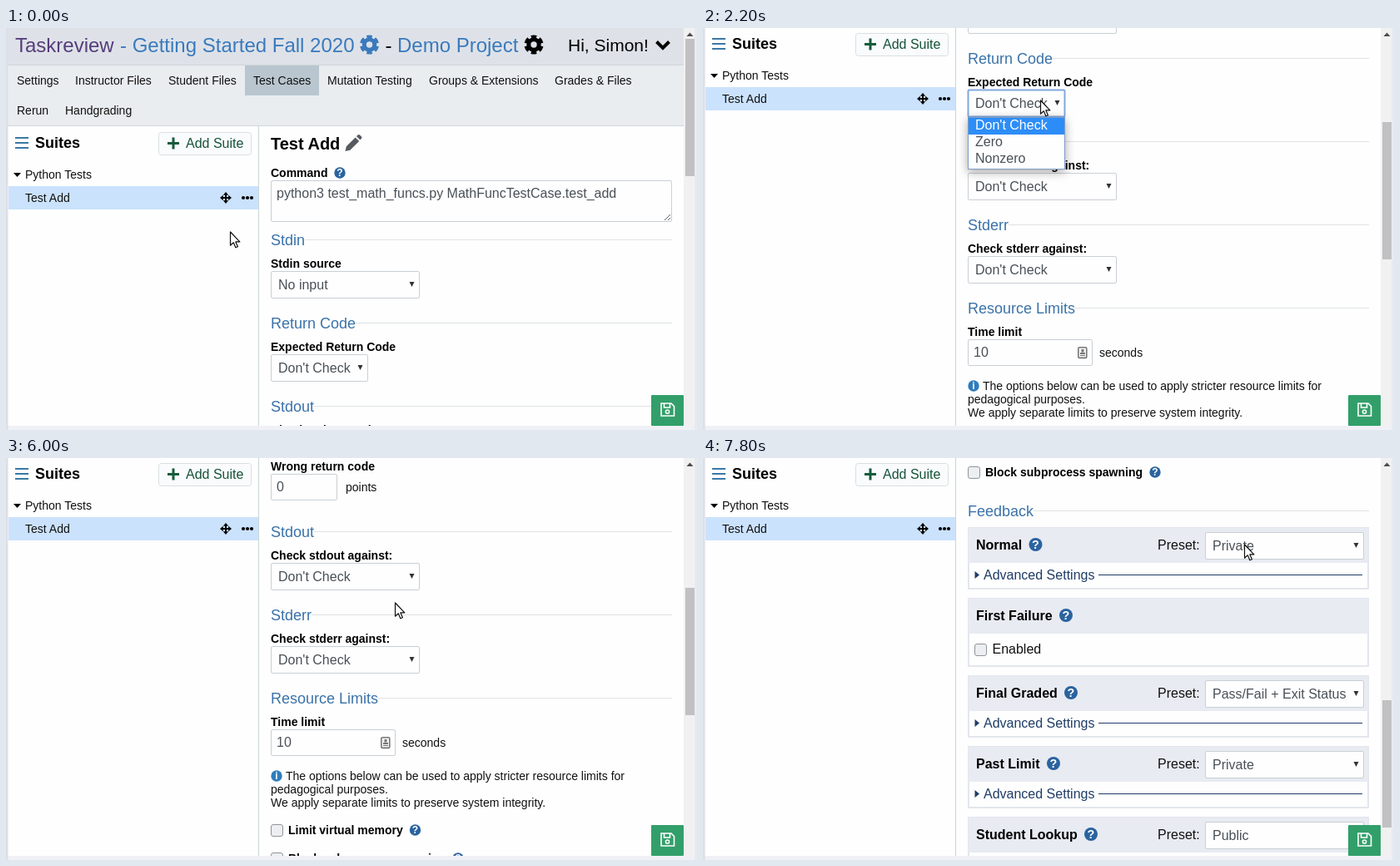
These frames come from a looping animation (830 px wide and 483 px high, 8 s). An HTML page:

```html
<!DOCTYPE html>
<html lang="en">
<head>
<meta charset="utf-8">
<title>Test case editor</title>
<style>
html, body { margin: 0; width: 100%; height: 100%; overflow: hidden; background: #fefefe; }
svg { display: block; width: 830px; height: 483px; font-family: "Liberation Sans", Arial, sans-serif; }
text { white-space: pre; }
.popup { filter: drop-shadow(0 3px 6px rgba(0, 0, 0, .35)); }
</style>
</head>
<body>
<svg id="stage" viewBox="0 0 830 483"></svg>
<script>
const LOOP = 8000, HEADER = 119, GROWTH = 124;
const INK = '#495057', LINK = '#3a72a9', HELP = '#2a639f', NAVY = '#1f3d66', EDGE = '#c9cfd5', FOCUS = '#82a8dc';
const stage = document.getElementById('stage');

// Drawing helpers
function add(parent, tag, attrs = {}, content) {
  const el = document.createElementNS('http://www.w3.org/2000/svg', tag);
  for (const key in attrs) el.setAttribute(key, attrs[key]);
  if (content !== undefined) el.textContent = content;
  return parent.appendChild(el);
}
const group = (parent = stage, attrs) => add(parent, 'g', attrs);
const rect = (g, x, y, width, height, fill, more) => add(g, 'rect', { x, y, width, height, fill, ...more });
const path = (g, d, fill = '#000', more) => add(g, 'path', { d, fill, ...more });
const stroke = (g, d, color, width = 1, more) => path(g, d, 'none', { stroke: color, 'stroke-width': width, ...more });
const circle = (g, cx, cy, r, fill, more) => add(g, 'circle', { cx, cy, r, fill, ...more });
const text = (g, x, y, str, size = 14, fill = '#111', more) =>
  add(g, 'text', { x, y, 'font-size': size, fill, ...more }, str);
const bold = (g, x, y, str, size = 14, fill = '#000') => text(g, x, y, str, size, fill, { 'font-weight': 700 });
const frame = (g, x, y, w, h, color = EDGE, width = 1) =>
  rect(g, x + .5, y + .5, w - 1, h - 1, '#fefefe', { rx: 1.5, stroke: color, 'stroke-width': width });
const focusRing = (g, x, y, w, h) =>
  rect(g, x + .5, y + .5, w - 1, h - 1, 'none', { rx: 1.5, stroke: FOCUS, 'stroke-width': 2 });

// Animation helpers: every value holds until the next step
function play(el, steps, style) {
  const frames = steps.map(step => ({ ...style(...step), offset: step[0] / LOOP, easing: 'step-end' }));
  frames.push({ ...style(...steps.at(-1)), offset: 1 });
  el.animate(frames, { duration: LOOP, iterations: Infinity });
}
function show(el, from, to = LOOP) {
  const steps = [[from, 1]];
  if (from > 0) steps.unshift([0, 0]);
  if (to < LOOP) steps.push([to, 0]);
  play(el, steps, (t, opacity) => ({ opacity }));
  return el;
}
const shift = (x, y) => ({ transform: `translate(${x}px, ${y}px)` });

// Icons
function gear(g, x, y, color) {
  circle(g, x, y, 6.2, 'none', { stroke: color, 'stroke-width': 5 });
  circle(g, x, y, 9.4, 'none', { stroke: color, 'stroke-width': 4.4, pathLength: 12,
    'stroke-dasharray': '1.25 .75', 'stroke-dashoffset': -.375 });
}
function help(g, x, y, r = 6.7, mark = '?', color = HELP) {
  circle(g, x, y, r, color);
  text(g, x, y + r * .66, mark, r * 1.8, '#fff', { 'font-weight': 700, 'text-anchor': 'middle' });
}
function checkbox(g, x, y) {
  rect(g, x + .5, y + .5, 14, 14, '#eceef1', { rx: 2.5, stroke: '#8f959b' });
}

// Form parts
function legend(g, y, str, lineX) {
  text(g, 318, y, str, 18, LINK);
  stroke(g, `M${lineX} ${y - 6.5}H800`, '#dfe2e5');
}
function select(g, x, y, w, h, value) {
  frame(g, x, y, w, h);
  path(g, `M${x + w - 12.5} ${y + 13}h6l-3 6z`, '#333');
  if (value) text(g, x + 9, y + h / 2 + 5.5, value, 16, INK);
}
function choice(g, y, title, lineX, label, value, w = 179) {
  legend(g, y, title, lineX);
  bold(g, 318, y + 27, label);
  select(g, 318, y + 31, w, 33, value);
}
function points(g, y, label) {
  bold(g, 318, y, label);
  frame(g, 318, y + 4, 80, 32);
  text(g, 408, y + 25, 'points');
}
function card(g, y, title, helpX, preset) {
  const height = preset ? 75 : 83;
  rect(g, 319, y + 1, 480, height - 2, '#fefefe', { stroke: '#e3e6ed', 'stroke-width': 2 });
  rect(g, 319, y + 1, 480, 42, '#e8ebf2');
  bold(g, 328, y + 27, title, 16);
  help(g, helpX, y + 21, 8);
  if (preset) {
    text(g, 546, y + 27, 'Preset:', 16);
    select(g, 603, y + 6, 191, 33, preset);
    path(g, `M326.5 ${y + 53}v9l5.5 -4.5z`, NAVY);
    text(g, 337, y + 63, 'Advanced Settings', 16, NAVY);
    stroke(g, `M475 ${y + 57.5}H792`, NAVY);
  } else {
    checkbox(g, 326, y + 55);
    text(g, 347.5, y + 67, 'Enabled', 16);
  }
}

// Main form
const panel = group();
bold(panel, 318, 146, 'Test Add', 20);
path(panel, 'M407.5 148l1.3-5.8L419.6 131.4l4.6 4.6L413.3 146.8ZM420.9 130.1l1.8-1.7q1.2-.9 2.3 0l2 2.1q1 1.1 0 2.2l-1.6 1.9Z', '#555b60');
bold(panel, 318, 179, 'Command');
help(panel, 401, 174);
frame(panel, 318, 183, 482, 50);
text(panel, 325, 204, 'python3 test_math_funcs.py MathFuncTestCase.test_add', 16, INK);
stroke(panel, 'M791 231l7-7M795 231l3-3', '#666');
choice(panel, 261, 'Stdin', 359, 'Stdin source', 'No input');
choice(panel, 361, 'Return Code', 420, 'Expected Return Code', '', 117);
show(text(panel, 327, 414, "Don't Check", 16, INK), 0, 3300);
show(text(panel, 327, 414, 'Zero', 16, INK), 3300);
show(focusRing(panel, 318, 392, 117, 33), 2200, 4100);

const extra = show(group(panel), 3300);
points(extra, 447, 'Correct return code');
points(extra, 505, 'Wrong return code');
text(extra, 325, 530, '0', 16, INK);
show(text(extra, 325, 472, '0', 16, INK), 0, 4100);
const selected = show(group(extra), 4100, 4700);
rect(selected, 325, 458, 9, 18, '#3390ff');
text(selected, 325, 472, '0', 16, '#fff');
show(text(extra, 325, 472, '2', 16, INK), 4900);
show(stroke(extra, 'M325.5 458v18', INK), 4700, 4900);
show(stroke(extra, 'M334.5 458v18', INK), 4900, 5500);
show(focusRing(extra, 318, 451, 80, 32), 4100);

const lower = group(panel);
choice(lower, 461, 'Stdout', 370, 'Check stdout against:', "Don't Check");
choice(lower, 561, 'Stderr', 367, 'Check stderr against:', "Don't Check");
legend(lower, 661, 'Resource Limits', 447);
bold(lower, 318, 688, 'Time limit');
frame(lower, 318, 692, 150, 32);
text(lower, 325, 713, '10', 16, INK);
rect(lower, 450.8, 701.8, 10, 12.6, '#f4f4f4', { rx: 1.5, stroke: '#777', 'stroke-width': 1.6 });
path(lower, 'M454.5 704h3v3.500h-3zM453 708h6v2h-6zM453 711h6v1h-6z', '#777');
text(lower, 476, 713, 'seconds');
help(lower, 325, 748, 6.7, 'i', '#2f7cbd');
text(lower, 336, 753, 'The options below can be used to apply stricter resource limits for');
text(lower, 318, 769, 'pedagogical purposes.');
text(lower, 318, 785, 'We apply separate limits to preserve system integrity.');
checkbox(lower, 318, 806);
bold(lower, 339, 818, 'Limit virtual memory');
help(lower, 491.5, 813);
checkbox(lower, 318, 840);
bold(lower, 339, 852, 'Block subprocess spawning');
help(lower, 543, 847);
legend(lower, 900, 'Feedback', 397);
card(lower, 913, 'Normal', 399.5, 'Private');
card(lower, 998, 'First Failure', 436);
card(lower, 1091, 'Final Graded', 442, 'Pass/Fail + Exit Status');
card(lower, 1176, 'Past Limit', 421, 'Private');
card(lower, 1261, 'Student Lookup', 466, 'Public');

// Page header and sidebar
const header = group();
rect(header, 0, 0, 814, 45, '#dee2e8');
rect(header, 0, 44, 814, 74, '#e9edf0');
stroke(header, 'M0 44.5H814M0 117.5H814', '#cfd6db');
text(header, 11, 29, 'Taskreview', 24, '#563d7c');
text(header, 137, 29, '- Getting Started Fall 2020', 24, '#3a7abd');
gear(header, 436.5, 20, '#3a7abd');
text(header, 455.5, 29, '-', 24, '#000');
text(header, 470, 29, 'Demo Project', 24, '#3a7abd');
gear(header, 634, 20, '#000');
text(header, 675, 28, 'Hi, Simon!', 21, '#000');
stroke(header, 'M781.500 16.500l7.500 7.500l7.500-7.500', '#000', 4);
rect(header, 287, 45, 89, 36, '#b9c6cf');
[[13, 'Settings'], [83, 'Instructor Files'], [195, 'Student Files'], [297, 'Test Cases'],
 [386, 'Mutation Testing'], [508, 'Groups & Extensions'], [659, 'Grades & Files']]
  .forEach(([x, label]) => text(header, x, 68, label));
text(header, 13, 104, 'Rerun');
text(header, 71, 104, 'Handgrading');

stroke(header, 'M303.5 118V700', '#c9d8d6');
stroke(header, 'M11 132h16M11 138h16M11 144h16', '#3a78a6', 2.2);
bold(header, 35, 144, 'Suites', 18);
rect(header, 183.5, 125.5, 111, 27, '#fafbfc', { rx: 3, stroke: '#d9dfe3' });
stroke(header, 'M194 138.500h14M201 131.500v14', '#155c3c', 3);
text(header, 216, 144, 'Add Suite', 16, '#16543a');
path(header, 'M9 174h9l-4.5 5z');
text(header, 23, 181, 'Python Tests');
rect(header, 3, 190, 300, 28, '#cbe2fd');
text(header, 23, 209, 'Test Add');
stroke(header, 'M259 204h10M264 199v10', '#000', 2);
for (let a = 0; a < 360; a += 90) path(header, 'M264 197l3.200 3.800h-6.400z', '#000', { transform: `rotate(${a} 264 204)` });
for (let x = 285; x <= 295; x += 5) circle(header, x, 204, 2.1, '#000');

// Window edges, scrollbar and save button
rect(stage, 814, 0, 13, 478, '#f1f1f2');
const thumb = rect(stage, 816, 0, 11, 165, '#c1c1c3');
path(stage, 'M817.500 10h8l-4-4.500z', '#4d4d4d');
rect(stage, 0, 478, 830, 5, '#eff1f6');
rect(stage, 0, 0, 2.5, 483, '#dedfe6');
rect(stage, 827, 0, 3, 483, '#e9eaf0');
const save = group();
rect(save, 775, 441, 39, 37, '#329f6a', { rx: 1 });
stroke(save, 'M787 451h12l3.500 3.500v11.500h-15.500zM790.500 451.500v4.500h7v-4.500', '#fff', 1.6);
circle(save, 794.5, 461, 2.1, 'none', { stroke: '#fff', 'stroke-width': 1.5 });
play(save, [[0, 1], [4700, .65], [4900, 1]], (t, opacity) => ({ opacity }));

// Drop-down list
const popup = show(group(stage, { class: 'popup' }), 2200, 3300);
rect(popup, 318.5, 107.5, 116, 62, '#fefefe', { stroke: '#7f9dc4' });
const options = ["Don't Check", 'Zero', 'Nonzero'];
options.forEach((label, i) => text(popup, 327, 122 + 20 * i, label, 16, INK));
[[0, 2600], [2600, LOOP]].forEach(([from, to], i) => {
  const active = show(group(popup), from, to);
  rect(active, 319, 108 + 20 * i, 115, 20, '#2d8df8');
  text(active, 327, 122 + 20 * i, options[i], 16, '#fff');
});

// Pointer
const arrow = path(stage, 'M.5 0V16.200L4.300 12.800L6.800 18.800L9.400 17.700L6.900 11.900H11.800Z', '#fff',
  { stroke: '#111', 'stroke-width': 1.2, 'stroke-linejoin': 'round' });
const beam = group();
const beamShape = 'M-4-7.500h3l1 1l1-1h3M-4 7.500h3l1-1l1 1h3M0-7v14';
stroke(beam, beamShape, '#fff', 3);
stroke(beam, beamShape, '#000', 1.5);
play(arrow, [[0, 269, 245], [1400, 273, 241], [1600, 355, 168], [1700, 430, 102], [1900, 405, 87],
  [2500, 441, 112], [2600, 434, 130], [2700, 421, 129], [2900, 371, 130], [5700, 467, 174],
  [7400, 490, 170], [7500, 550, 150], [7600, 615, 124], [7700, 645, 108], [7800, 650, 104]],
  (t, x, y) => ({ ...shift(x, y), opacity: t === 2900 ? 1 : 1 }));
play(beam, [[0, 370, 143], [3600, 369, 146], [3700, 370, 148], [3800, 370, 149]], (t, x, y) => shift(x, y));
show(beam, 3500, 5700);
play(arrow, [[0, 'visible'], [3500, 'hidden'], [5700, 'visible']], (t, visibility) => ({ visibility }));

// Scrolling
const scroll = [[0, 0], [500, 22], [600, 82], [700, 146], [800, 196], [900, 236], [1000, 268], [1100, 292],
  [1200, 309], [1300, 318], [3300, 318], [5700, 345], [5800, 410], [5900, 466], [6000, 490], [6200, 520],
  [6300, 590], [6400, 655], [6500, 684], [6700, 706], [6800, 765], [6900, 835], [7000, 895], [7100, 938], [7200, 954]];
play(panel, scroll, (t, y) => shift(0, -y));
play(header, scroll, (t, y) => shift(0, -Math.min(y, HEADER)));
play(thumb, scroll, (t, y) => t < 3300
  ? { ...shift(0, Math.round(13 + y * .3145)), height: '165px' }
  : { ...shift(0, Math.round(13 + y * .2915)), height: '153px' });
play(lower, [[0, 0], [3300, GROWTH]], (t, y) => shift(0, y));
</script>
</body>
</html>
```
